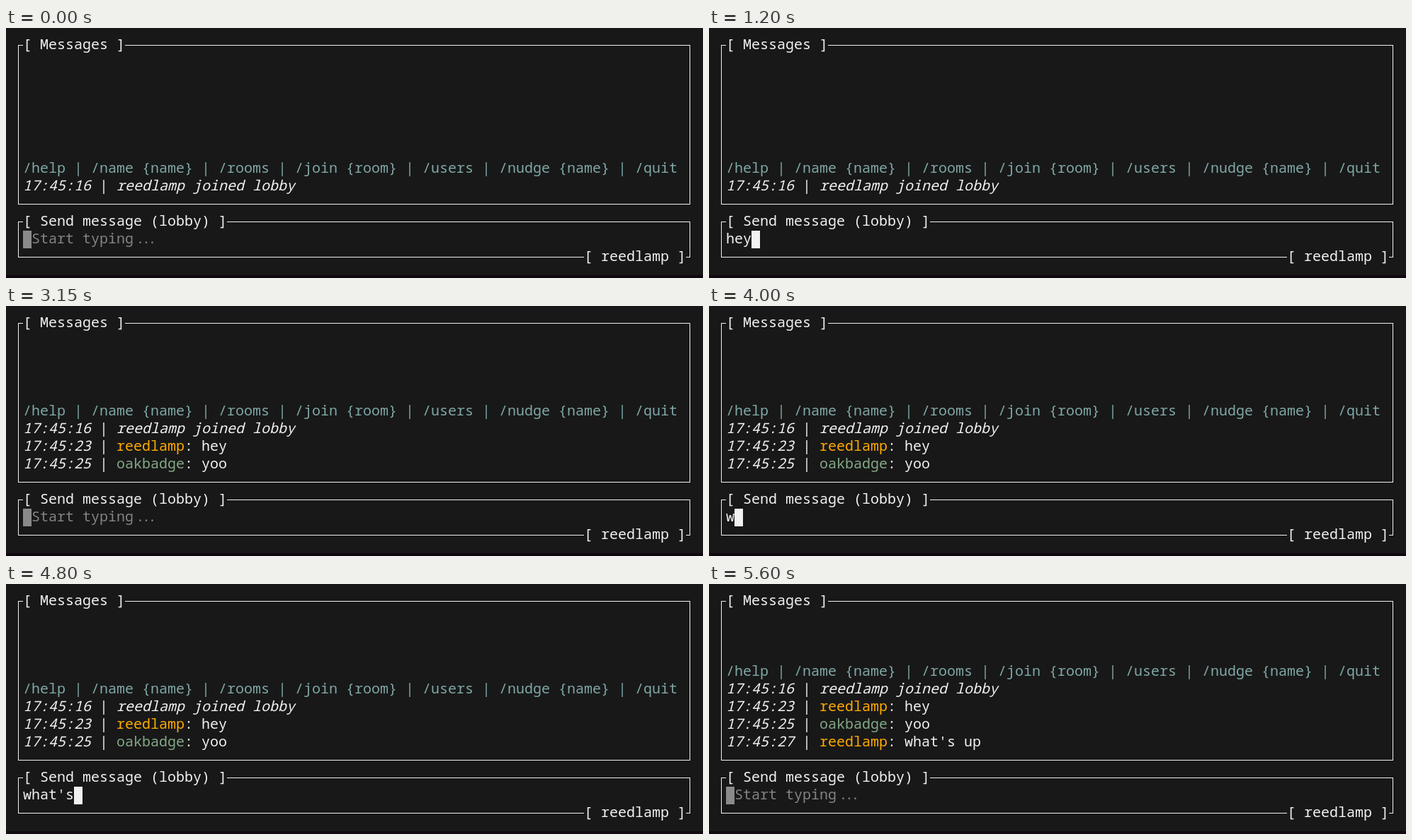
Animation, 984 px wide and 354 px high, one loop 8 s. Source, as an HTML page with a canvas:

```html
<!DOCTYPE html>
<html lang="en">
<head>
<meta charset="utf-8">
<title>Terminal chat</title>
<style>
  html, body { margin: 0; width: 100%; height: 100%; overflow: hidden; background: #181818; }
  canvas { display: block; }
</style>
</head>
<body>
<canvas id="stage" width="984" height="354"></canvas>
<script>
const ctx = document.getElementById('stage').getContext('2d');
const LOOP = 8000, CELL = 12, ROW = 25, LEFT = 24, TOP = 12, LAST_ROW = 8, INPUT_ROW = 11;
const BG = '#181818', FG = '#f1f1f1', TEAL = '#7fa7a6', ORANGE = '#ffaa00',
      GREEN = '#82a886', GREY = '#838383', CURSOR_IDLE = '#8a8a8a';
const ME = 'reedlamp', FRIEND = 'oakbadge';
const HELP = '/help | /name {name} | /rooms | /join {room} | /users | /nudge {name} | /quit';

const messages = [
  { at: 0, time: '17:45:16', note: ME + ' joined lobby' },
  { at: 1500, time: '17:45:23', name: ME, color: ORANGE, text: 'hey' },
  { at: 3150, time: '17:45:25', name: FRIEND, color: GREEN, text: 'yoo' },
  { at: 5600, time: '17:45:27', name: ME, color: ORANGE, text: "what's up" }
];

// Key press times for each typed line, and when it is sent.
const typed = [
  { text: 'hey', keys: [900, 1100, 1200], sent: 1450 },
  { text: "what's up", keys: [4000, 4200, 4300, 4450, 4600, 4800, 5000, 5100, 5350], sent: 5600 }
];

function write(text, col, row, color, italic) {
  ctx.font = (italic ? 'italic ' : '') + '20px "Noto Sans Mono", monospace';
  ctx.fillStyle = color;
  ctx.fillText(text, LEFT + col * CELL, TOP + row * ROW + 18);
}

function panel(row, rows) {
  ctx.strokeStyle = FG;
  ctx.lineWidth = 1;
  ctx.strokeRect(17.5, TOP + row * ROW + 12.5, 948, rows * ROW);
}

function label(text, col, row) {
  ctx.fillStyle = BG;
  ctx.fillRect(LEFT + col * CELL, TOP + row * ROW, text.length * CELL, ROW);
  write(text, col, row, FG);
}

function cursor(col, color) {
  ctx.fillStyle = color;
  ctx.fillRect(LEFT + col * CELL, TOP + INPUT_ROW * ROW, CELL, ROW);
}

function drawMessages(t) {
  const shown = messages.filter(m => t >= m.at);
  const first = LAST_ROW - shown.length + 1;
  write(HELP, 0, first - 1, TEAL);
  shown.forEach((m, i) => {
    const row = first + i;
    write(m.time, 0, row, FG, true);
    write('|', 9, row, FG);
    if (m.note) {
      write(m.note, 11, row, FG, true);
    } else {
      write(m.name, 11, row, m.color);
      write(': ' + m.text, 11 + m.name.length, row, FG);
    }
  });
}

function drawInput(t) {
  const line = typed.find(l => t >= l.keys[0] && t < l.sent);
  if (line) {
    const count = line.keys.filter(k => t >= k).length;
    write(line.text.slice(0, count), 0, INPUT_ROW, FG);
    cursor(count, FG);
  } else {
    cursor(0, CURSOR_IDLE);
    write('Start typing', 1, INPUT_ROW, GREY);
    // The ellipsis is set tighter than the grid.
    for (let i = 0; i < 3; i++) write('.', 13.3 + i * 0.7, INPUT_ROW, GREY);
  }
}

function draw(t) {
  ctx.fillStyle = BG;
  ctx.fillRect(0, 0, 984, 354);
  ctx.fillStyle = '#10080f';
  ctx.fillRect(0, 350, 984, 4);
  panel(0, 9);
  panel(10, 2);
  label('[ Messages ]', 0, 0);
  label('[ Send message (lobby) ]', 0, 10);
  label('[ ' + ME + ' ]', 66, 12);
  drawMessages(t);
  drawInput(t);
}

const start = performance.now();
function tick() {
  draw((performance.now() - start) % LOOP);
  requestAnimationFrame(tick);
}
tick();
</script>
</body>
</html>
```
